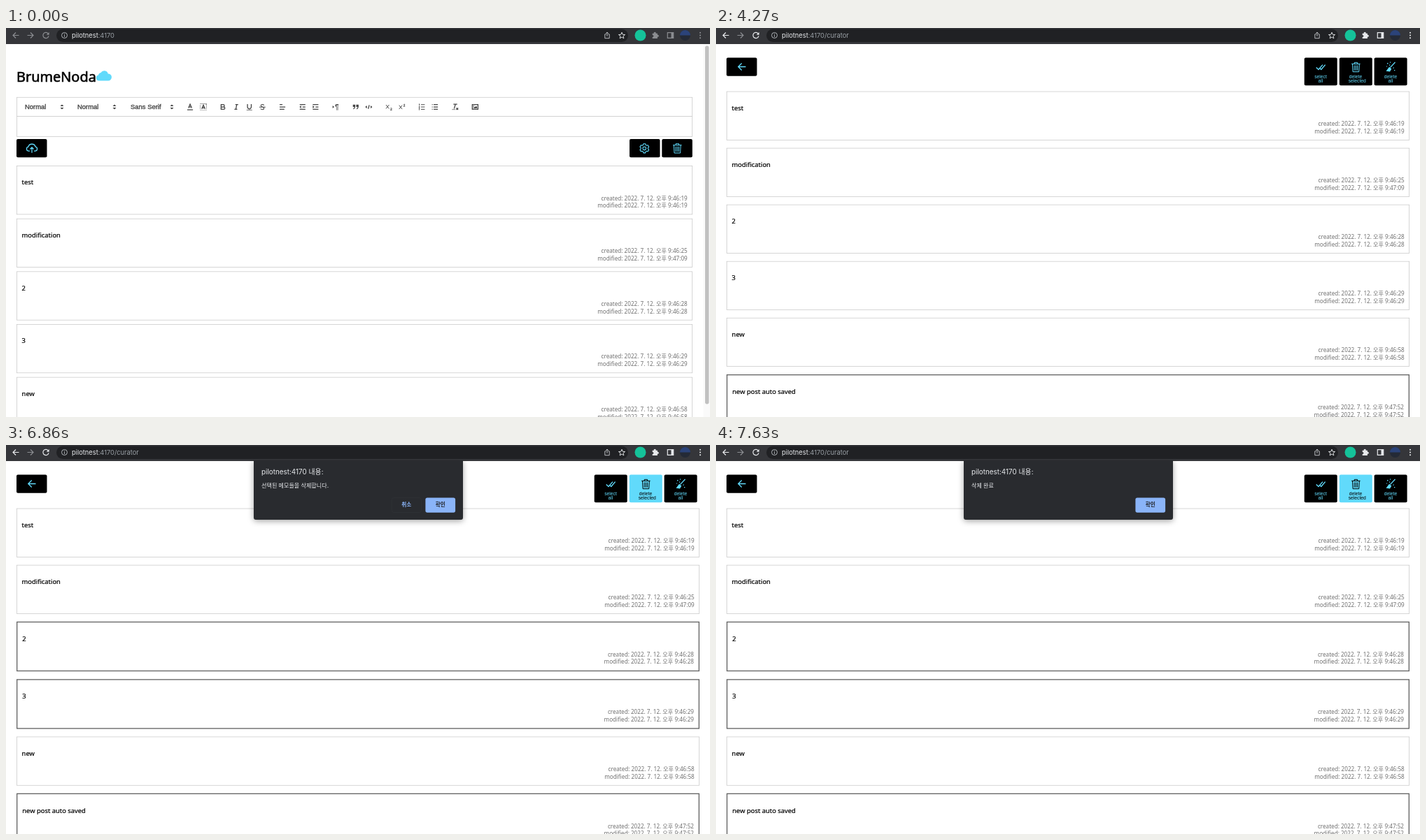
An HTML page that plays this animation: 1006 by 557 pixels, repeating every 8000 ms.

```html
<!DOCTYPE html>
<html lang="ko">
<head>
<meta charset="utf-8">
<title>Memo manager</title>
<style>
html, body { margin: 0; width: 100%; height: 100%; overflow: hidden; background: #fff; }
svg { display: block; position: absolute; }
text { font-family: "Noto Sans", "Noto Sans CJK KR", sans-serif; white-space: pre; }
.ui { font-family: Inter, "Noto Sans CJK KR", sans-serif; }
.arial { font-family: "Liberation Sans", Arial, sans-serif; }
.pick { stroke: #444; stroke-width: .35; }
.note { stroke: #000; stroke-width: .2; }
.title { stroke: #000; stroke-width: .6; }
#layer { position: absolute; top: 21px; left: 0; width: 1006px; height: 536px; overflow: hidden; }
.dialog {
  left: 353.5px; top: 1px; background: #292b2f; border-radius: 0 0 3px 3px;
  box-shadow: 0 2px 8px rgba(0,0,0,.36); transform-origin: 50% 100%; visibility: hidden;
}
</style>
</head>
<body>
<svg id="stage" width="1006" height="557"></svg>
<div id="layer">
  <svg class="dialog" id="ask" width="299" height="85"></svg>
  <svg class="dialog" id="done" width="299" height="85"></svg>
</div>
<script>
const LOOP = 8000, STEP = 70;
const CYAN = '#61dafb', DIM = '#8b8d91', LIGHT = '#e8eaed', INK = '#444';
const HOST = 'pilotnest', PORT = ':4170', PATH = '/curator';

const notes = [
  ['test', '46:19', '46:19'],
  ['modification', '46:25', '47:09'],
  ['2', '46:28', '46:28'],
  ['3', '46:29', '46:29'],
  ['new', '46:58', '46:58'],
  ['new post auto saved', '47:52', '47:52'],
];
const selectedAt = { 5: 4270, 3: 5110, 2: 5530 };

const $ = id => document.getElementById(id);
const clamp = v => Math.max(0, Math.min(1, v));
const text = (x, y, s, size, fill, attrs = '') =>
  `<text x="${x}" y="${y}" font-size="${size}" fill="${fill}" ${attrs}>${s}</text>`;
const rect = (x, y, w, h, fill, r = 0, attrs = '') =>
  `<rect x="${x}" y="${y}" width="${w}" height="${h}" rx="${r}" fill="${fill}" ${attrs}/>`;
const disc = (x, y, r, fill) => `<circle cx="${x}" cy="${y}" r="${r}" fill="${fill}"/>`;
const line = (x, y, d, color, w = 1.2, attrs = '') =>
  `<path transform="translate(${x} ${y})" d="${d}" fill="none" stroke="${color}" stroke-width="${w}" ${attrs}/>`;
const solid = (x, y, d, color) => `<path transform="translate(${x} ${y})" d="${d}" fill="${color}"/>`;
const smallButton = (x, y, fill = '#000') => rect(x, y, 43.5, 26.3, fill, 2);
const bigButton = (x, fill = '#000') => rect(x, 42.4, 47, 39.9, fill, 2);

// Closed outline from [radius, degrees] pairs
const polar = points => 'M' + points.map(([r, deg]) => {
  const a = deg * Math.PI / 180;
  return (r * Math.cos(a)).toFixed(2) + ' ' + (r * Math.sin(a)).toFixed(2);
}).join('L') + 'z';
const star = polar(Array.from({ length: 10 }, (_, i) => [i % 2 ? 2.1 : 4.8, i * 36 - 90]));
const cog = polar(Array.from({ length: 24 }, (_, i) =>
  [i % 4 < 2 ? 6.7 : 5.2, Math.floor(i / 4) * 60 + 30 + [-12, 12, 20, 40][i % 4]]));

function browserBar(active, url) {
  const c = active ? LIGHT : DIM;
  return rect(0, 0, 1006, 23, '#35363a') + rect(72, 1.5, 817, 18.5, '#202124', 9.2) +
    line(14, 10.5, 'M4.5 0H-4M0-4L-4 0 0 4', c) +
    line(35, 10.5, 'M-4.5 0H4M0-4L4 0 0 4', DIM) +
    line(57, 10.5, 'M3.2-2.6A4.1 4.1 0 1 0 4 .9', c) + solid(57, 10.5, 'M4.6-4.6V-.8H.8z', c) +
    line(83.5, 10.5, 'M-4 0a4 4 0 1 0 8 0a4 4 0 1 0-8 0M0-.6V2.3M0-2.3V-1.3', '#bdc1c6', .9) +
    text(94, 14, `${HOST}<tspan fill="#9aa0a6">${url}</tspan>`, 9.3, LIGHT, 'class="ui"') +
    line(859, 10.5, 'M-1.5-1.6H-3.2V4.2H3.2V-1.6H1.5M0 1.4V-4.4M-1.8-2.7L0-4.5 1.8-2.7', '#c8cbcf', .9) +
    line(880, 11, star, LIGHT, .9) +
    disc(906.5, 10.5, 8, '#15c39a') +
    solid(928, 10.5, 'M-4.3-2.8h2.2a1.4 1.4 0 1 1 2.6 0H2.9v2.3a1.4 1.4 0 1 1 0 2.6V4.6H-4.3V2.3a1.3 1.3 0 1 0 0-2.5z', c) +
    line(949.5, 10.5, 'M-4.2-3.8H4.2V3.8H-4.2z', c) + rect(950.5, 7, 3, 7, c) +
    disc(970.5, 10.5, 7.5, '#242a36') + solid(970.5, 10.5, 'M-7.5 0a7.5 7.5 0 0 1 15 0z', '#2b4379') +
    [-3.7, 0, 3.7].map(dy => disc(992, 10.5 + dy, 1.05, c)).join('');
}

function card(top, right, [title, created, modified], selected) {
  const b = selected ? 1.35 : .68, inset = b - .68;
  const stamp = (dy, label, time) => text(right - 7.3 - inset, top + dy + inset,
    `${label}: 2022. 7. 12. 오후 9:${time}`, 8.15, '#707070', 'text-anchor="end"');
  return rect(15 + b / 2, top + b / 2, right - 15 - b, 68.65 + b, '#fff', 0,
      `stroke="${selected ? '#666' : '#c4c4c4'}" stroke-width="${b}"`) +
    text(22.6 + inset, top + 27.2 + inset, title, 9.4, '#000', 'class="note"') +
    stamp(49.3, 'created', created) + stamp(60, 'modified', modified);
}

const trash = (x, y, c) => line(x, y,
  'M-6.2-4.6H6.2M-2.2-4.6V-6.6H2.2V-4.6M-4.9-4.6L-4.3 6.7H4.3L4.9-4.6M-2.2-2.6V4.8M0-2.6V4.8M2.2-2.6V4.8', c, 1);

// Editor icons on an 18-unit grid: [x, outlined path, filled path, stroke width]
const tools = [
  [263, 'M3 15H15M5.5 11L9 3 12.5 11M11.6 9H6.4'],
  [282, 'M5.5 13L9 5 12.5 13M11.6 11H6.4', 'M2 2h2v1H2zM5 2h2v1H5zM8 2h2v1H8zM11 2h2v1h-2zM14 2h2v2h-2zM2 5h1v2H2zM2 8h1v2H2zM2 11h1v2H2zM15 5h1v2h-1zM15 8h1v2h-1zM15 11h1v2h-1zM2 15h2v1H2zM5 15h2v1H5zM8 15h2v1H8zM11 15h2v1h-2zM14 15h2v1h-2z'],
  [310, 'M5 4H9.5a2.5 2.5 0 0 1 0 5H5zM5 9h5.5a2.5 2.5 0 0 1 0 5H5z'],
  [329, 'M7 4H13M5 14H11M8 14L10 4'],
  [347.7, 'M5 3V9a4 4 0 0 0 8 0V3', 'M3 15h12v1H3z'],
  [366.3, 'M12.5 5.5C11 3 6 3.3 5.7 6C5.5 9 12.5 9 12.5 12C12.3 15 6.5 15 5 12.5M2.5 9.3H15.5', '', 1.5],
  [395, 'M3 9H15M3 14H13M3 4H9'],
  [423.7, 'M3 14H15M3 4H15M9 9H15', 'M6 6V12L2.5 9z'],
  [442.3, 'M3 14H15M3 4H15M9 9H15', 'M3 6V12L6.5 9z'],
  [471, 'M11 4H15', 'M2.5 12L6 9 2.5 6zM11 3a3 3 0 0 0 0 6h1V3zM11 4h1V16h-1zM13 4h1V16h-1z'],
  [499.7, 'M7 8c0 4-3 5-3 5M14 8c0 4-3 5-3 5', 'M3 4h5v5H3zM10 4h5v5h-5z'],
  [518.3, 'M5 7L3 9 5 11M13 7L15 9 13 11M10 5L8 13'],
  [547, 'M3 4.5L9.5 12.5M9.5 4.5L3 12.5M12.5 12q2-1.8 2.6 0q0 1.5-2.8 3.5h3.4', '', 1.4],
  [565.7, 'M3 5.5L9.5 13.5M9.5 5.5L3 13.5M12.5 4q2-1.8 2.6 0q0 1.5-2.8 3.5h3.4', '', 1.4],
  [594.3, 'M7 4H15M7 9H15M7 14H15M2.5 3.4L3.6 2.6V6M2.4 8q2-.8 1.6.5L2.5 10.5H4.6M2.4 12.5H4L3.2 14Q5 14.5 2.5 15.6', '', 1.4],
  [613, 'M6 4H15M6 9H15M6 14H15M2.5 4H4M2.5 9H4M2.5 14H4'],
  [642, 'M5 3H13M6.5 12.5L9.4 3M11 11L15 15M15 11L11 15', 'M2 14h7v1H2z'],
  [670.3, 'M3 4H15V14H3z', 'M5 12V11L7 9 8 10 11 7 13 9V12zM5 6h2v2H5z'],
].map(([x, d, fill, w = 1.9]) =>
  `<g transform="translate(${x - 6} 107) scale(.675)">${line(0, 0, d, INK, w)}${fill ? solid(0, 0, fill, INK) : ''}</g>`).join('');

const pickers = [[27, 'Normal', 80], [102, 'Normal', 155], [178, 'Sans Serif', 237]].map(([x, s, ax]) =>
  text(x, 116.2, s, 9.45, INK, 'class="arial pick"') + solid(ax, 113, 'M-2.5-.9L0-3.6 2.5-.9zM-2.5.9L0 3.6 2.5.9z', INK)).join('');

function homePage(hover) {
  const frame = 'stroke="#ccc" stroke-width=".8"';
  return text(15, 77.3, 'BrumeNoda', 19.9, '#000', 'class="title"') +
    solid(140, 68, 'M-7 7.5a4 4 0 0 1-1-7.9A4.2 4.2 0 0 1-4.5-4A5.6 5.6 0 0 1 5.8-2.6A5 5 0 0 1 6 7.5z', CYAN) +
    rect(15.4, 99.3, 965.2, 27.2, '#fff', 0, frame) + rect(15.4, 126.5, 965.2, 29, '#fff', 0, frame) +
    pickers + tools +
    smallButton(15, 159) + smallButton(891, 159, hover ? CYAN : '#000') + smallButton(937.3, 159) +
    line(37, 172.5, 'M-3 3.6H-5A3 3 0 0 1-5.2-2.3A5.4 5.4 0 0 1 5.2-2.3A3 3 0 0 1 5 3.6H3M0 6.2V-1.4M-2.6 1L0-1.6 2.6 1', CYAN, 1.3) +
    line(912.3, 172.3, cog + 'M-2.3 0a2.3 2.3 0 1 0 4.6 0a2.3 2.3 0 1 0-4.6 0', hover ? '#000' : CYAN, 1.1, 'stroke-linejoin="round"') +
    trash(959.3, 172.3, CYAN) +
    notes.map((n, i) => card(197.2 + i * 75.65, 981, n, false)).join('') +
    rect(996.5, 23, 9.5, 534, '#fafafa') + rect(999, 25.5, 5.5, 513, '#c1c1c1', 2.7);
}

function managerPage(t) {
  const hover = t >= 6300, c = hover ? '#000' : CYAN;
  const label = (x, y, s, color) => text(x, y, s, 6.75, color, 'class="arial" text-anchor="middle"');
  let top = 90.7;
  const cards = notes.map((n, i) => {
    const selected = t >= selectedAt[i], out = card(top, 991, n, selected);
    top += selected ? 82.4 : 81.05;
    return out;
  }).join('');
  return smallButton(15, 42.4) +
    line(37, 55.5, 'M5.5 0H-5M-.3-5L-5.2 0-.3 5', CYAN, 1.3) +
    bigButton(840.7) + bigButton(890.8, hover ? CYAN : '#000') + bigButton(940.6) +
    line(864, 56, 'M-6.3.4L-3 3.5 3-3.4M-1 1.8L.8 3.5 6.6-3.4', CYAN, 1.4) +
    label(864, 71.6, 'select', CYAN) + label(864, 78, 'all', CYAN) +
    trash(914.4, 56, c) + label(914, 71.6, 'delete', c) + label(916.3, 78, 'selected', c) +
    line(964, 55.5, 'M6.5-6.5L-.5 1', CYAN, 1.2) + solid(964, 55.5, 'M-2 .2L1.3 3-1 7-6.5 6.2z', CYAN) +
    solid(964, 55.5, 'M-5-5.5h1.4v1.4H-5zM-1-7h1.2v1.2H-1zM-2-3h1.2v1.2H-2zM3.5 1h1.3v1.3H3.5zM5 4.5h1.3v1.3H5zM-6-1h1v1h-1z', CYAN) +
    label(964, 71.6, 'delete', CYAN) + label(964, 78, 'all', CYAN) + cards;
}

const dialog = (message, cancel) => {
  const caption = (x, s, fill) =>
    text(x, 66.4, s, 7.6, fill, 'class="ui" font-weight="600" text-anchor="middle"');
  return text(11, 19.8, `${HOST}${PORT} 내용:`, 9.9, LIGHT, 'class="ui"') +
    text(11, 39, message, 8.1, LIGHT, 'class="ui" font-weight="500"') +
    (cancel ? rect(197.3, 53.7, 42, 20.8, 'none', 2.7, 'stroke="#303337" stroke-width=".8"') +
      caption(218.3, '취소', '#8ab4f8') : '') +
    rect(245.4, 53.4, 42.7, 21.3, '#8ab4f8', 2.7) + caption(266.7, '확인', '#202124');
};

$('ask').innerHTML = dialog('선택된 메모들을 삭제합니다.', true);
$('done').innerHTML = dialog('삭제 완료', false);

// A fading sheet also tips backwards and slides up under the bar
function pose(el, opacity) {
  const tilt = (1 - opacity) / .6;
  el.style.visibility = opacity > 0 ? 'visible' : 'hidden';
  el.style.opacity = opacity;
  el.style.transform = tilt ?
    `matrix3d(1,0,0,0, 0,${1 + .04 * tilt},0,${-.00067 * tilt}, 0,0,1,0, 0,${-8.5 * tilt},0,1)` : 'none';
}

let last = -1;
const start = performance.now();
function draw() {
  const t = Math.floor((performance.now() - start) % LOOP / STEP) * STEP;
  if (t !== last) {
    const home = t < 1120;
    $('stage').innerHTML = browserBar(t >= 140, home ? PORT : PORT + PATH) +
      (home ? homePage(t >= 490) : managerPage(t));
    const fade = (t - 7350) / STEP * .3;
    pose($('ask'), t < 6790 ? 0 : t < 7350 ? clamp(.5 + (t - 6790) / 140) : clamp(1 - fade));
    pose($('done'), t < 7420 ? 0 : clamp(fade - .2));
    last = t;
  }
  requestAnimationFrame(draw);
}
draw();
</script>
</body>
</html>
```
